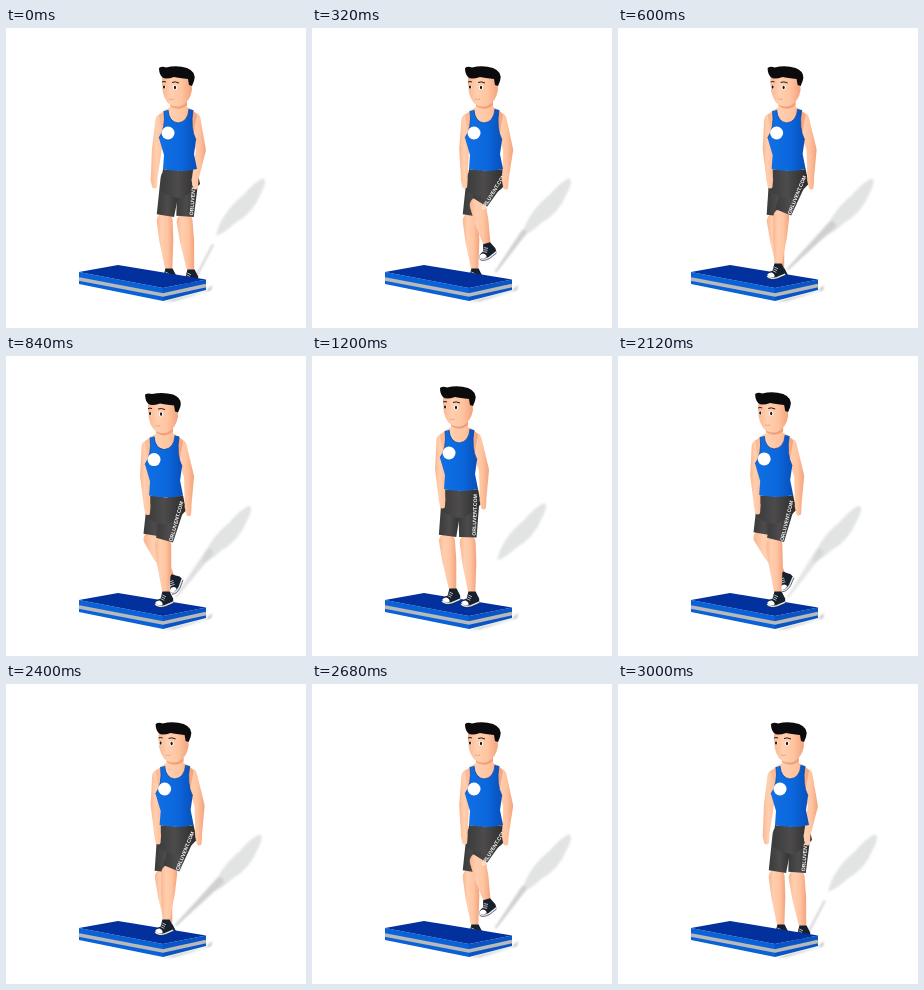
An HTML page for the animation above (3.04 s loop, 300x300 px).

```html
<!DOCTYPE html>
<html lang="en">
<head>
<meta charset="utf-8">
<title>Step up exercise</title>
<style>
html, body { margin: 0; width: 100%; height: 100%; overflow: hidden; background: #fff; }
svg { display: block; width: 100vw; height: 100vh; }
text { font: 700 5.2px "Liberation Sans", Arial, sans-serif; fill: #fff; }
</style>
</head>
<body>
<svg viewBox="0 0 300 300">
  <defs>
    <linearGradient id="skin"><stop stop-color="#fbb68e"/><stop offset=".3" stop-color="#ffcfb0"/><stop offset=".65" stop-color="#ffc4a0"/><stop offset="1" stop-color="#f2a37c"/></linearGradient>
    <linearGradient id="shirt"><stop stop-color="#1070e4"/><stop offset=".6" stop-color="#0b66dc"/><stop offset="1" stop-color="#084fb8"/></linearGradient>
    <linearGradient id="cloth"><stop stop-color="#3b3b3b"/><stop offset=".45" stop-color="#4d4b4b"/><stop offset="1" stop-color="#2b2b2b"/></linearGradient>
    <filter id="soft" x="-20%" y="-20%" width="140%" height="140%"><feGaussianBlur stdDeviation="1"/></filter>
    <g id="shoe" transform="scale(.9)">
      <path d="M-4-4 4-4Q6 0 8 4L8 8-1 12Q-10 14-12 10-12 6-6 4Z" fill="#17202d"/>
      <path d="M-12 9Q-11 6-7 6-3 8-4 11-9 13-12 9Z" fill="#fff"/>
      <path d="M-12 10Q-9 14-1 12L8 8" fill="none" stroke="#e9edf2" stroke-width="1.7"/>
      <path d="M-12 11.500Q-9 15-1 13.200L8 9.300" fill="none" stroke="#1c2431" stroke-width=".7"/>
      <path d="M-6 4-2 6M-5 2-1 4M-4 0 0 2" stroke="#eee" stroke-width=".8"/>
    </g>
  </defs>

  <g filter="url(#soft)">
    <path id="blob" fill="#e2e4e4" d="M39 184Q44 162 66 144 78 130 86 127 91 129 84 142 76 162 58 172 45 184 39 184Z"/>
    <path id="streak" fill="#d0d0d0"/>
  </g>

  <g id="scene">
    <g id="far"><path class="shin" fill="url(#skin)"/><use class="foot" href="#shoe"/><path class="thigh" fill="url(#cloth)"/></g>
    <g id="near"><path class="shin" fill="url(#skin)"/><use class="foot" href="#shoe"/><path class="thigh" fill="url(#cloth)"/></g>
    <g id="step">
      <path d="M157 274 200 263 206 257 205 262 168 273Z" fill="#bbb" filter="url(#soft)"/>
      <path d="M73 244 157 260V273L73 256Z" fill="#0a62d8"/>
      <path d="M157 260 200 251.500V262L157 273Z" fill="#0a55c6"/>
      <path d="M73 251 157 267 200 257.500" fill="none" stroke="#b9b9b9" stroke-width="3.400"/>
      <path d="M73 244 112 237 200 251.500 157 260Z" fill="#02309c"/>
    </g>
  </g>

  <path id="hips" fill="url(#cloth)" d="M-14 83Q4 87 20 83L23 98Q14 108 4 112-8 112-17 104Z"/>
  <text id="label" text-anchor="middle">ORLUVENT.COM</text>
  <path id="armL" fill="url(#skin)"/>
  <path id="armR" fill="url(#skin)"/>
  <g id="body">
    <path d="M-7 12H9L10 21Q17 24 20 29L17 45H-15L-18 29Q-14 25-7 21Z" fill="url(#skin)"/>
    <path d="M-13 25-9 24Q-8 36 1 37 11 36 12 23L16 24Q13 42 19 54L17 68 20 83Q4 87-14 83L-13 69-18 52Q-11 42-13 25Z" fill="url(#shirt)"/>
    <path d="M-9 24Q-8 36 1 37 11 36 12 23M16 24Q13 42 19 54M-13 25Q-11 42-18 52" fill="none" stroke="#0a4aa8" stroke-width=".8"/>
    <circle cx="-9" cy="47" r="6.500" fill="#fff"/>
    <path d="M-7 14Q1 25 10 14L10 19Q2 26-7 20Z" fill="#e99870" opacity=".8"/>
    <path d="M-15-9Q-2-15 14-9L15 4Q13 16 4 20-5 22-10 16-16 8-15-9Z" fill="url(#skin)"/>
    <path d="M-18-18Q-15-20-11-18.500 0-21 10-18 20-14 17-5L15 0 12-1 11-7Q2-8-3-9-12-6-15-9-18-12-18-18Z" fill="#0b0b0d"/>
    <path d="M-15-4Q-13-5-11-4M-5-3.500Q-2-5 2-3" fill="none" stroke="#2a1a14"/>
    <g fill="#fff"><ellipse cx="-13" cy="1" rx="1.600" ry="2.200"/><ellipse cx="-2" cy="1.500" rx="2.300" ry="2.300"/></g>
    <g fill="#17110f"><ellipse cx="-13" cy="1" rx="1" ry="1.800"/><ellipse cx="-2" cy="1.500" rx="1.100" ry="1.800"/></g>
    <path d="M-8 13Q-6 14-3 13" fill="none" stroke="#e79b7c" stroke-width=".8"/>
  </g>
</svg>
<script>
const LOOP = 3040, RISE = 1200, FALL = 1840, FRAME = 40;
const THIGH = 44, SHIN = 53, FORESHORTEN = 0.4;
const $ = s => document.querySelector(s);

const mix = (a, b, u) => a + (b - a) * u;
const between = (p, q, u) => p.map((v, i) => mix(v, q[i], u));
const ease = (from, to, time) => {
  const u = Math.min(1, Math.max(0, (time - from) / (to - from)));
  return u * u * (3 - 2 * u);
};
const setPath = (el, d) => el.setAttribute("d", d);
const move = (el, x, y, turn = 0) => el.setAttribute("transform", `translate(${x} ${y}) rotate(${turn})`);

// Segment with different end widths; the far end is round or flat.
function taper([x1, y1], w1, [x2, y2], w2, flat) {
  const len = Math.hypot(x2 - x1, y2 - y1) || 1, nx = (y1 - y2) / len / 2, ny = (x2 - x1) / len / 2;
  const r1 = w1 / 2, r2 = w2 / 2;
  const end = flat ? "L" : `A${r2} ${r2} 0 0 0 `;
  return `M${x1 + nx * w1} ${y1 + ny * w1}L${x2 + nx * w2} ${y2 + ny * w2}` +
    `${end}${x2 - nx * w2} ${y2 - ny * w2}L${x1 - nx * w1} ${y1 - ny * w1}` +
    `A${r1} ${r1} 0 0 0 ${x1 + nx * w1} ${y1 + ny * w1}Z`;
}

// The foot travels between two points, swinging back and up on the way.
function stride(from, to, u, back, lift) {
  const arc = Math.sin(Math.PI * u), [x, y] = between(from, to, u);
  return [x + back * arc, y - lift * arc];
}

// Two-bone leg whose knee bends toward the step.
function kneeOf([hx, hy], [ax, ay]) {
  const len = Math.hypot(ax - hx, ay - hy), dx = (ax - hx) / len, dy = (ay - hy) / len;
  const along = (THIGH ** 2 - SHIN ** 2 + len ** 2) / (2 * len);
  const bend = FORESHORTEN * Math.sqrt(Math.max(0, THIGH ** 2 - along ** 2));
  return [hx + dx * along - dy * bend, hy + dy * along + dx * bend];
}

function drawLeg(id, hip, ankle, u, tilt) {
  const leg = $(id), knee = kneeOf(hip, ankle), calf = between(knee, ankle, 0.4);
  setPath(leg.querySelector(".shin"), taper(knee, 16, calf, 14) + taper(calf, 14, ankle, 6.5));
  setPath(leg.querySelector(".thigh"), taper(hip, 21, between(hip, knee, 0.88), 17.5, true));
  move(leg.querySelector(".foot"), ...ankle, -tilt * Math.sin(Math.PI * u) * (1 - u));
  return knee;
}

function drawArm(id, shoulder, elbow, wrist) {
  const fingers = [wrist[0] + 0.5, wrist[1] + 7];
  setPath($(id), taper(shoulder, 13, elbow, 10) + taper(elbow, 10, wrist, 6.5) + taper(wrist, 7, fingers, 5));
}

function drawLabel(hip, knee) {
  const slant = Math.atan2(hip[1] - knee[1], hip[0] - knee[0]), [x, y] = between(hip, knee, 0.36);
  move($("#label"), x - Math.sin(slant) * 8, y + Math.cos(slant) * 8, slant * 180 / Math.PI);
}

function stack(...ids) {
  const scene = $("#scene");
  ids.map($).forEach((layer, i) => {
    if (scene.children[i] !== layer) scene.insertBefore(layer, scene.children[i]);
  });
}

function draw(clock) {
  const t = Math.floor(clock % LOOP / FRAME) * FRAME;
  const time = t < FALL ? Math.min(t, RISE) : LOOP - FRAME - t;
  const first = ease(0, 560, time), second = ease(600, RISE, time), climb = ease(420, RISE, time);

  const x = mix(171, 146, climb), y = mix(58, 50, climb ** 3);
  const at = (dx, dy) => [x + dx, y + dy];
  move($("#body"), x, y);
  move($("#hips"), x, y);

  const farAnkle = stride([163, 244], [141, 236], second, 12, 20);
  const nearAnkle = stride([185, 245], [160, 239], first, 6, 24);
  const nearHip = at(11, 93);
  drawLeg("#far", at(-6, 93), farAnkle, second, 80);
  drawLabel(nearHip, drawLeg("#near", nearHip, nearAnkle, first, 40));
  if (first < 0.12) stack("#far", "#near", "#step");
  else if (second < 0.08) stack("#far", "#step", "#near");
  else stack("#step", "#far", "#near");

  const turn = 7 * (1 - first);
  drawArm("#armL", at(-15, 34), at(-18 - turn * 0.3, 63), at(-16 - turn, 93));
  drawArm("#armR", at(17, 33), at(26 - turn * 0.3, 64), at(25 - turn, 94));

  const drop = y * 0.4, from = [nearAnkle[0] + mix(6, 10, first), mix(247, 241, first)];
  move($("#blob"), x, drop);
  setPath($("#streak"), taper(from, 2, between(from, [x + 46, drop + 174], mix(0.6, 1, first)), mix(2, 8, first)));
  $("#streak").setAttribute("opacity", 1 - second);
}

const start = performance.now();
function tick() {
  draw(performance.now() - start);
  requestAnimationFrame(tick);
}
draw(0);
requestAnimationFrame(tick);
</script>
</body>
</html>
```
